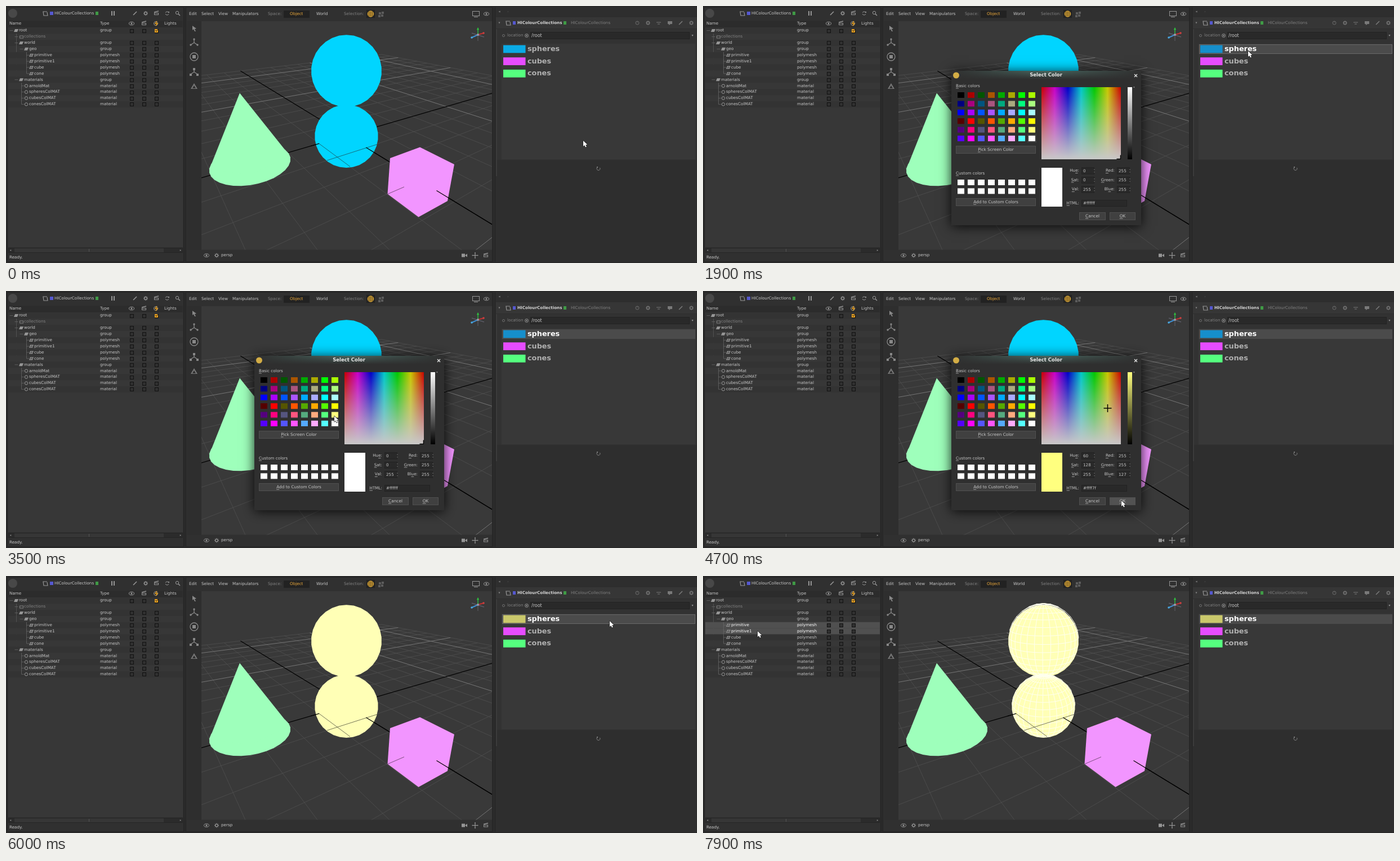
An HTML page with a canvas for the animation above (8000 ms loop, 1227 by 456 pixels).

```html
<!DOCTYPE html>
<html lang="en">
<head>
<meta charset="utf-8">
<title>Colour collections</title>
<style>
html, body { margin: 0; width: 100%; height: 100%; overflow: hidden; background: #2b2b2b; }
canvas { display: block; }
</style>
</head>
<body>
<canvas id="stage" width="1227" height="456"></canvas>
<script>
const g = document.getElementById('stage').getContext('2d');
const LOOP = 8000, STEP = 100;
const TEXT = '#c6c6c6', DIM = '#808080', ICON = '#969696';

// Drawing helpers
function box(x, y, w, h, fill, stroke) {
  if (fill) { g.fillStyle = fill; g.fillRect(x, y, w, h); }
  if (stroke) { g.strokeStyle = stroke; g.lineWidth = 1; g.strokeRect(x + .5, y + .5, w - 1, h - 1); }
}
function text(s, x, y, color = TEXT, { size = 7.2, bold = false, align = 'left', key = -1 } = {}) {
  g.font = `${bold ? 'bold ' : ''}${size}px "DejaVu Sans", sans-serif`;
  g.textAlign = 'left';
  g.textBaseline = 'middle';
  const width = s => g.measureText(s).width;
  x -= align === 'center' ? width(s) / 2 : align === 'right' ? width(s) : 0;
  g.fillStyle = color;
  g.fillText(s, x, y);
  if (key >= 0) g.fillRect(x + width(s.slice(0, key)), y + 3.6, width(s[key]), .7);
}
function path(points, close) {
  g.beginPath();
  points.forEach(([x, y]) => g.lineTo(x, y));
  if (close) g.closePath();
}
function poly(points, fill) { path(points, true); g.fillStyle = fill; g.fill(); }
function line(points, color, width = 1) { path(points); g.strokeStyle = color; g.lineWidth = width; g.stroke(); }
function disc(x, y, r, fill) { g.beginPath(); g.arc(x, y, r, 0, 7); g.fillStyle = fill; g.fill(); }
function ring(x, y, r, color = ICON, width = 1, from = 0, to = Math.PI * 2) {
  g.beginPath(); g.arc(x, y, r, from, to); g.strokeStyle = color; g.lineWidth = width; g.stroke();
}
const triangle = (x, y, dx, dy, color = ICON) =>
  poly([[x + dx, y + dy], [x - dx - dy, y - dy + dx], [x - dx + dy, y - dy - dx]], color);

// Icons
const icons = {
  page(x, y) { line([[x + 3, y - 3], [x - 4, y - 3], [x - 3, y + 4], [x + 4, y + 4], [x + 3, y - 2]], ICON, 1.2); },
  pause(x, y) { box(x - 3, y - 4, 2, 8, ICON); box(x + 1, y - 4, 2, 8, ICON); },
  pencil(x, y) { line([[x - 3, y + 3], [x + 3, y - 3]], ICON, 1.6); },
  gear(x, y, c = ICON) {
    ring(x, y, 2.3, c, 1.3);
    for (let i = 0; i < 8; i++) {
      const a = i * Math.PI / 4, dx = Math.cos(a), dy = Math.sin(a);
      line([[x + 3 * dx, y + 3 * dy], [x + 4 * dx, y + 4 * dy]], c, 1);
    }
  },
  clapper(x, y) { box(x - 4, y - 1, 8, 4, null, ICON); line([[x - 4, y - 2], [x + 4, y - 4]], ICON, 1.4); },
  refresh(x, y) { ring(x, y, 3, ICON, 1, .3, 2.8); ring(x, y, 3, ICON, 1, 3.5, 5.9); box(x + 2, y - 3, 2, 2, ICON); },
  search(x, y) { ring(x - 1, y - 1, 2.7); line([[x + 1, y + 1], [x + 4, y + 4]], ICON, 1.5); },
  eye(x, y) {
    g.beginPath(); g.ellipse(x, y, 4.5, 2.8, 0, 0, 7);
    g.strokeStyle = ICON; g.lineWidth = 1; g.stroke();
    disc(x, y, 1.5, ICON);
  },
  help(x, y) { ring(x, y, 3, DIM); text('?', x, y, DIM, { size: 5, align: 'center' }); },
  screen(x, y) { box(x - 6, y - 5, 13, 9, null, ICON); box(x - 3, y + 5, 7, 1, ICON); },
  slider(x, y) { line([[x - 4, y - 1], [x + 4, y - 1]], ICON); line([[x - 2, y + 2], [x + 2, y + 2]], ICON); },
  bubble(x, y) { box(x - 4, y - 3, 8, 5, ICON); poly([[x - 2, y + 2], [x + 1, y + 2], [x - 2, y + 4]], ICON); },
  cross(x, y) {
    line([[x - 5, y], [x + 5, y]], ICON, 1.2); line([[x, y - 5], [x, y + 5]], ICON, 1.2);
    for (const [dx, dy] of [[1, 0], [-1, 0], [0, 1], [0, -1]]) triangle(x + 5 * dx, y + 5 * dy, dx, dy);
  },
  camera(x, y) { box(x - 5, y - 3, 6, 6, ICON); poly([[x + 1, y], [x + 5, y - 3], [x + 5, y + 3]], ICON); },
  group(x, y, c = ICON) { poly([[x - 2, y - 2.5], [x + 4, y - 2.5], [x + 2, y + 2.5], [x - 4, y + 2.5]], c); },
  mesh(x, y) { icons.group(x, y); line([[x - 3, y], [x + 3, y]], '#333', .7); line([[x + 1, y - 2], [x - 1, y + 2]], '#333', .7); },
  material(x, y) { ring(x, y, 2.7); },
  folder(x, y) { box(x - 3, y - 2, 7, 5, null, DIM); },
};
const iconRow = (y, list) => list.forEach(([name, x]) => icons[name](x, y));

// Left panel: [label, type, indent, icon]
const tree = [
  ['root', 'group', 0, 'group'], ['collections', '', 1, 'folder'], ['world', 'group', 1, 'group'],
  ['geo', 'group', 2, 'group'], ['primitive', 'polymesh', 3, 'mesh'], ['primitive1', 'polymesh', 3, 'mesh'],
  ['cube', 'polymesh', 3, 'mesh'], ['cone', 'polymesh', 3, 'mesh'], ['materials', 'group', 1, 'group'],
  ['arnoldMat', 'material', 2, 'material'], ['spheresColMAT', 'material', 2, 'material'],
  ['cubesColMAT', 'material', 2, 'material'], ['conesColMAT', 'material', 2, 'material'],
];
function checkbox(x, y) { box(x - 3, Math.round(y) - 3, 7, 7, '#303030', '#111'); }

function leftPanel(state) {
  box(2, 2, 314, 452, '#303030', '#242424');
  disc(12, 13, 8, state.busy ? '#707070' : '#484848');
  icons.page(70, 13);
  box(78, 10, 6, 6, '#5558d0');
  text('HIColourCollections', 86, 13);
  box(159, 10, 5, 6, '#3f9a45');
  iconRow(13, [['pause', 190], ['pencil', 229], ['gear', 248], ['clapper', 267], ['refresh', 286], ['search', 305]]);
  box(4, 26, 310, 12, '#2c2c2c');
  text('Name', 6, 31.5); text('Type', 167, 31.5); text('Lights', 281, 31.5);
  iconRow(31, [['eye', 223], ['clapper', 245]]);
  ring(266, 31, 3.5, ICON); line([[268, 27], [265, 31], [269, 31], [266, 35]], '#e8a020', 1.4);
  box(4, 38, 310, 390, '#373737');
  line([[9.5, 46], [9.5, 44], [14, 44]], '#666');
  line([[18.5, 47], [18.5, 131]], '#5a5a5a', .8);
  line([[27.5, 69], [27.5, 76], [33, 76]], '#5a5a5a', .8);
  tree.forEach(([label, type, indent, icon], i) => {
    const y = 43.6 + 10.9 * i, x = [23, 32, 41, 50][indent];
    const selected = state.wire && (i === 4 || i === 5);
    box(4, y - 5.4, 310, 10.9, selected ? '#505050' : i % 2 ? '#373737' : '#333333');
    const dim = type === '', color = selected ? '#fff' : dim ? DIM : TEXT;
    const trunk = x - 13.5;
    if (indent > 1 && i !== 3) {
      line([[trunk, y - 5.4], [trunk, i === 7 || i === 12 ? y : y + 5.5]], '#666', .8);
      line([[trunk, y], [trunk + 5, y]], '#666', .8);
    } else {
      if (i > 0 && i < 8) line([[18.5, y - 5.4], [18.5, y + 5.5]], '#5a5a5a', .8);
      line([[trunk - 3, y], [trunk + 3, y]], '#666', .8);
    }
    icons[icon](x - 5, y, dim ? DIM : ICON);
    text(label, x, y, color);
    text(type, 167, y, color);
    if (!dim) [223, 245, 267].forEach(cx => checkbox(cx, y));
  });
  box(264, 41, 6, 6, '#e8a020');
  line([[265, 43], [267, 45], [270, 41]], '#222');
  box(4, 429, 310, 9, '#2b2b2b', '#252525');
  box(15, 430, 265, 7, '#363636'); box(147, 431, 1, 5, '#555');
  triangle(8, 433.5, -1.2, 0); triangle(310, 433.5, 1.2, 0);
  text('Ready.', 6, 446.5);
}

// Camera orbiting the centre of the viewport; one unit is a sphere radius.
const CX = 604.7, CY = 230, FOCAL = 490.5, DIST = 8.8, SIN = .421, COS = .907, YS = .823, YC = .568;
function toView(a, b, h) {
  const u = YC * a + YS * b, w = YC * b - YS * a;
  return { u, w, depth: DIST + w * COS - h * SIN };
}
function project(a, b, h = 0) {
  const { u, w, depth } = toView(a, b, h);
  return [CX + FOCAL * u / depth, CY - FOCAL * (w * SIN + h * COS) / depth];
}
function ground(a0, b0, a1, b1, color, width = 1) {
  const near = .6, d0 = toView(a0, b0, 0).depth, d1 = toView(a1, b1, 0).depth;
  if (d0 < near && d1 < near) return;
  const cut = (near - d0) / (d1 - d0), mid = [a0 + (a1 - a0) * cut, b0 + (b1 - b0) * cut];
  line([project(...(d0 < near ? mid : [a0, b0])), project(...(d1 < near ? mid : [a1, b1]))], color, width);
}
// Faceted ellipse; skew tilts its long axis.
function oval(x, y, rx, ry, skew = 0) {
  const n = 30;
  return Array.from({ length: n }, (_, i) => {
    const a = (i + .5) * 2 * Math.PI / n;
    return [x + rx * Math.cos(a), y + ry * Math.sin(a + skew)];
  });
}
function wireSphere(height) {
  const n = 30, half = n / 2;
  const at = (i, j) => {
    const lon = i * 2 * Math.PI / n, lat = (j / half - .5) * Math.PI;
    return [Math.cos(lat) * Math.cos(lon), Math.cos(lat) * Math.sin(lon), Math.sin(lat)];
  };
  const facing = ([a, b, h]) => {
    const { w } = toView(a, b, 0);
    return -w * DIST * COS + h * (DIST * SIN - height) > 1;
  };
  const edge = (p, q) => {
    if (facing(p) && facing(q))
      line([p, q].map(([a, b, h]) => project(a, b, h + height)), '#fffff0', 1);
  };
  for (let i = 0; i < n; i++) for (let j = 0; j < half; j++) {
    edge(at(i, j), at(i, j + 1));
    edge(at(i, j), at(i + 1, j));
  }
}

function scene(state) {
  g.save();
  g.beginPath(); g.rect(347, 27, 516, 405.5); g.clip();
  box(347, 27, 516, 406, '#393939');
  const GRID = '#505050', MAJOR = '#7c7c7c', size = 12;
  for (const major of [false, true]) for (let i = -size; i <= size; i++) {
    if (!i || (i % 5 === 0) !== major) continue;
    const color = major ? MAJOR : GRID, width = major ? .9 : .8;
    ground(i, -size, i, size, color, width);
    ground(-size, i, size, i, color, width);
  }
  ground(-size, 0, size, 0, '#000', 1.2);
  ground(0, -size, 0, size, '#000', 1.2);

  const color = state.yellow ? '#ffffb6' : '#00d5ff';
  poly(oval(604.5, 115.2, 62.6, 64), color);
  poly(oval(604.5, 231, 56.3, 56), color);
  if (state.wire) { wireSphere(2.06); wireSphere(0); }
  const front = state.yellow ? '#66664c' : '#17606f';
  line([[570, 274], [659, 245.5]], front, .9);
  line([[555, 243.5], [611, 285]], front, .9);
  ground(1, 0, 2.5, 0, '#000', 1.2);
  ground(0, -1, 0, -1.3, '#000', 1.2);

  const CONE = '#9effbb';
  poly(oval(433, 282, 72.3, 37.3, -.273), CONE);
  poly([[415, 154.5], [361, 290], [433, 300], [504, 266]], CONE);

  poly([[735, 250.5], [796, 281], [784, 346], [732.5, 374.5], [677.5, 333.5], [682, 270]], '#f295ff');
  line([[678, 333.5], [707, 321]], '#6b4470', .9);
  line([[764.5, 327.5], [863, 387.5]], '#000', 1.2);

  line([[827, 48], [849, 55]], '#667', 1.2);
  line([[838, 51], [827, 56]], '#3f8fd0', 2);
  line([[838, 51], [848, 48]], '#c03030', 2);
  line([[838, 51], [838, 40]], '#30b040', 1.6);
  triangle(838, 40, 0, -2.2, '#30c040');
  disc(827, 56, 1.8, '#4aa8e0'); disc(848, 48, 1.8, '#d04040'); disc(838, 51, 2, '#99a');
  line([[838, 53], [838, 62]], '#606068', 1);
  g.restore();
}

function viewport(state) {
  box(319, 2, 545, 452, '#303030', '#242424');
  [['Edit', 325], ['Select', 347], ['View', 377], ['Manipulators', 402], ['World', 551]]
    .forEach(([s, x]) => text(s, x, 14.5));
  text('Space:', 465, 14.5, DIM); text('Selection:', 600, 14.5, DIM);
  box(493, 8, 46, 13, '#222');
  text('Object', 504, 14.5, '#f0ac3c');
  box(640, 7, 15, 14, '#222');
  disc(647.5, 14, 5.8, '#c99a35');
  for (let i = -3; i <= 3; i += 3) {
    line([[643, 14 + i], [652, 14 + i]], '#66501f', .7);
    line([[647.5 + i, 10], [647.5 + i, 18]], '#66501f', .7);
  }
  [[662, 11], [667, 10], [661, 16], [666, 15]].forEach(([x, y]) => box(x, y, 4, 4, '#5c5c5c'));
  iconRow(14, [['screen', 834], ['eye', 853]]);
  box(322, 27, 25, 406, '#2e2e2e');
  poly([[331, 35], [338, 40], [335, 41], [337, 45], [335, 45], [333, 41], [331, 43]], '#888');
  [65, 117].forEach(y => {
    [[0, -6], [-6, 4], [6, 4]].forEach(([dx, dy]) => {
      line([[334, y], [334 + dx, y + dy]], '#888', 1.3);
      y > 100 ? box(332 + dx, y + dy - 1, 4, 4, '#888') : disc(334 + dx, y + dy, 1.7, '#888');
    });
  });
  ring(334, 90, 7, '#888', 1.3); box(331, 87, 6, 6, '#888');
  poly([[334, 137], [340, 147], [328, 147]], '#777');
  poly([[334, 141], [337, 146], [331, 146]], '#2e2e2e');
  scene(state);
  iconRow(442.5, [['eye', 356], ['gear', 374], ['camera', 814], ['cross', 833], ['clapper', 852]]);
  text('persp', 382, 442.5);
}

function rightPanel(state) {
  box(867, 2, 360, 452, '#2e2e2e');
  box(868, 2, 1, 452, '#222');
  triangle(876, 10, -1.6, 0, '#777'); triangle(892, 10, 1.6, 0, '#3c3c3c');
  box(870, 20, 357, 20, '#363636');
  triangle(876, 30, 0, 1.5, '#888');
  icons.page(892, 30);
  box(900, 27, 5, 6, '#5558d0');
  text('HIColourCollections', 908, 30.5, '#d4d4d4', { bold: true });
  box(990, 27, 5, 6, '#3f9a45');
  text('HIColourCollections', 1003, 30.5, DIM);
  g.globalAlpha = .7;
  iconRow(30, [['help', 1121], ['gear', 1140], ['slider', 1159], ['bubble', 1179], ['pencil', 1198], ['gear', 1217]]);
  g.globalAlpha = 1;
  box(872, 41, 355, 232, '#323232'); box(870, 41, 2, 261, '#3a3a3a');
  ring(883.5, 52.5, 2, DIM, .8);
  text('location', 890, 52.5, DIM);
  ring(924.5, 52.5, 3, ICON); disc(924.5, 52.5, 1.2, ICON);
  box(931, 46, 283, 13, '#292929', '#222');
  text('/root', 933, 52.5, TEXT, { size: 8 });
  triangle(1219, 52.5, 0, 1.5);
  box(879, 66, 346, 207, '#383838', '#333');
  const swatch = state.yellow ? '#c9c86b' : state.selected ? '#168fcb' : '#0aaae5';
  if (state.selected) box(881, 68, 343, 17, '#4b4b4b', state.focus ? '#686868' : null);
  [['spheres', swatch], ['cubes', '#e64cff'], ['cones', '#55ff7f']].forEach(([label, color], i) => {
    const y = 76.5 + 21.7 * i;
    box(883, y - 7, 39.5, 13.8, color);
    text(label, 926, y, !i && state.selected ? '#fff' : '#b0b0b0', { size: 12.8, bold: true });
  });
  ring(1052, 288.5, 3, DIM, 1, -.5, 4.2);
  box(1049, 285, 2, 2, DIM);
}

// Colour dialog
function button(label, x, y, w, hover) {
  box(x, y, w, 14, hover ? '#525252' : '#404040', '#505050');
  text(label, x + w / 2, y + 7, TEXT, { size: 7.35, align: 'center', key: 0 });
}
function field(label, key, value, right, y, w = 23) {
  text(label, right, y, TEXT, { align: 'right', key });
  box(right + 4, y - 6, w, 12, '#292929', '#222');
  text(value, right + 7, y + .3);
  if (w > 30) return;
  triangle(right + 27, y - 2.5, 0, -.8); triangle(right + 27, y + 2.5, 0, .8);
}
function dialog({ picked, okHover }) {
  g.save();
  g.shadowColor = 'rgba(0,0,0,.85)'; g.shadowBlur = 20; g.shadowOffsetY = 2;
  box(441, 115, 337, 274, '#2f2f2f');
  g.restore();
  const bar = g.createLinearGradient(441, 0, 778, 0);
  ['#303030', '#48665f', '#303030'].forEach((c, i) => bar.addColorStop(i / 2, c));
  box(441, 115, 337, 15, bar);
  const fade = g.createLinearGradient(0, 115, 0, 130);
  fade.addColorStop(0, 'rgba(47,47,47,0)'); fade.addColorStop(1, '#2f2f2f');
  box(441, 115, 337, 15, fade);
  disc(449.5, 123, 5.5, '#d3ad45');
  text('Select Color', 609, 123, '#e6e6e6', { size: 8.5, bold: true, align: 'center' });
  line([[766, 121], [771, 126]], '#ddd', 1.4); line([[771, 121], [766, 126]], '#ddd', 1.4);

  text('Basic colors', 449, 142, TEXT, { key: 0 });
  for (let row = 0; row < 6; row++) for (let col = 0; col < 8; col++) {
    const x = 452 + 18 * col, y = 153 + 15.4 * row;
    const red = (row < 3 ? 0 : 85) + col % 2 * 170, green = 85 * (col >> 1), blue = 127 * (row % 3) + (row % 3 >> 1);
    if (col === 7 && row === (picked ? 4 : 5)) box(x - 2, Math.round(y) - 2, 16, 14, null, '#444');
    box(x, y, 12, 10, `rgb(${red},${green},${blue})`);
  }
  button('Pick Screen Color', 449, 248, 142);
  text('Custom colors', 449, 297, TEXT, { key: 0 });
  for (let i = 0; i < 16; i++) box(452 + 18 * (i % 8), 308 + 15.4 * (i >> 3), 12, 10, '#fff');
  button('Add to Custom Colors', 449, 341, 142);

  const hues = g.createLinearGradient(601, 0, 742, 0);
  for (let i = 0; i <= 6; i++) hues.addColorStop(i / 6, `hsl(${360 - 60 * i},100%,39.2%)`);
  box(601, 144, 141, 128, hues);
  const pale = g.createLinearGradient(0, 144, 0, 272);
  pale.addColorStop(0, 'rgba(200,200,200,0)'); pale.addColorStop(1, '#c8c8c8');
  box(601, 144, 141, 128, pale);
  g.save();
  g.beginPath(); g.rect(601, 144, 141, 128); g.clip();
  const [mx, my] = picked ? [718.5, 208] : [741.5, 271.5];
  line([[mx - 7, my], [mx + 7, my]], '#000', 1.5); line([[mx, my - 7], [mx, my + 7]], '#000', 1.5);
  g.restore();
  const tone = picked ? '#ffff7f' : '#ffffff';
  const values = g.createLinearGradient(0, 144, 0, 272);
  values.addColorStop(0, tone); values.addColorStop(1, '#000');
  box(754, 144, 8, 128, values);
  triangle(765, 144, -1.2, 0);

  box(601, 287, 37, 69, tone);
  field('Hue:', 2, picked ? '60' : '0', 668, 292.5);
  field('Sat:', 0, picked ? '128' : '0', 668, 309);
  field('Val:', 0, '255', 668, 325.5);
  field('Red:', 0, '255', 731, 292.5);
  field('Green:', 0, '255', 731, 309);
  field('Blue:', 2, picked ? '127' : '255', 731, 325.5);
  field('HTML:', 0, tone, 668, 350, 81);
  button('Cancel', 668, 366, 47);
  button('OK', 722, 366, 46, okHover);
}

// Pointer: [time, x, y]
const track = [
  [200, 1025, 239], [700, 963, 75], [800, 953, 93], [1100, 953, 93], [1200, 1049, 76], [1300, 1049, 76],
  [1400, 1000, 74], [1600, 968, 80], [1900, 968, 80], [2400, 734, 259], [2500, 734, 259], [3000, 630, 163],
  [3300, 578, 218], [3400, 578, 218], [3500, 583, 222], [3800, 583, 222], [4300, 743, 372], [5100, 743, 372],
  [5600, 1010, 73], [5800, 1029, 92], [5900, 1029, 92], [6000, 1072, 80], [6100, 1072, 80], [6400, 998, 93],
  [6900, 998, 93], [7600, 98, 85], [7900, 97, 98],
];
function pointer(t) {
  let i = track.findIndex(k => k[0] >= t);
  if (i < 0) i = track.length - 1;
  const [t1, x1, y1] = track[i], [t0, x0, y0] = track[Math.max(0, i - 1)];
  let p = t1 > t0 ? Math.min(1, (t - t0) / (t1 - t0)) : 1;
  p = p * p * (3 - 2 * p);
  const x = x0 + (x1 - x0) * p, y = y0 + (y1 - y0) * p;
  const shape = [[0, 0], [0, 10], [2.3, 8], [4, 11.5], [5.8, 10.7], [4.2, 7.3], [7.3, 7]].map(([dx, dy]) => [x + dx, y + dy]);
  path(shape, true);
  g.lineJoin = 'round'; g.lineWidth = 1.4; g.strokeStyle = '#222'; g.stroke();
  g.fillStyle = '#fff'; g.fill();
  g.lineJoin = 'miter';
}

function draw(t) {
  const open = t >= 1900 && t < 4800;
  const state = {
    selected: t >= 1000,
    yellow: t >= 4800,
    wire: t >= 6900,
    focus: t < 2000 || (t >= 4800 && t < 6900),
    busy: (t >= 4800 && t < 5000) || (t >= 6900 && t < 7400),
    picked: t >= 3700,
    okHover: t >= 4300,
  };
  box(0, 0, 1227, 456, '#2a2a2a');
  leftPanel(state);
  viewport(state);
  rightPanel(state);
  if (open) dialog(state);
  pointer(t);
}

let shown = -1;
function tick() {
  const t = Math.floor(performance.now() % LOOP / STEP) * STEP;
  if (t !== shown) draw(shown = t);
  requestAnimationFrame(tick);
}
tick();
</script>
</body>
</html>
```
